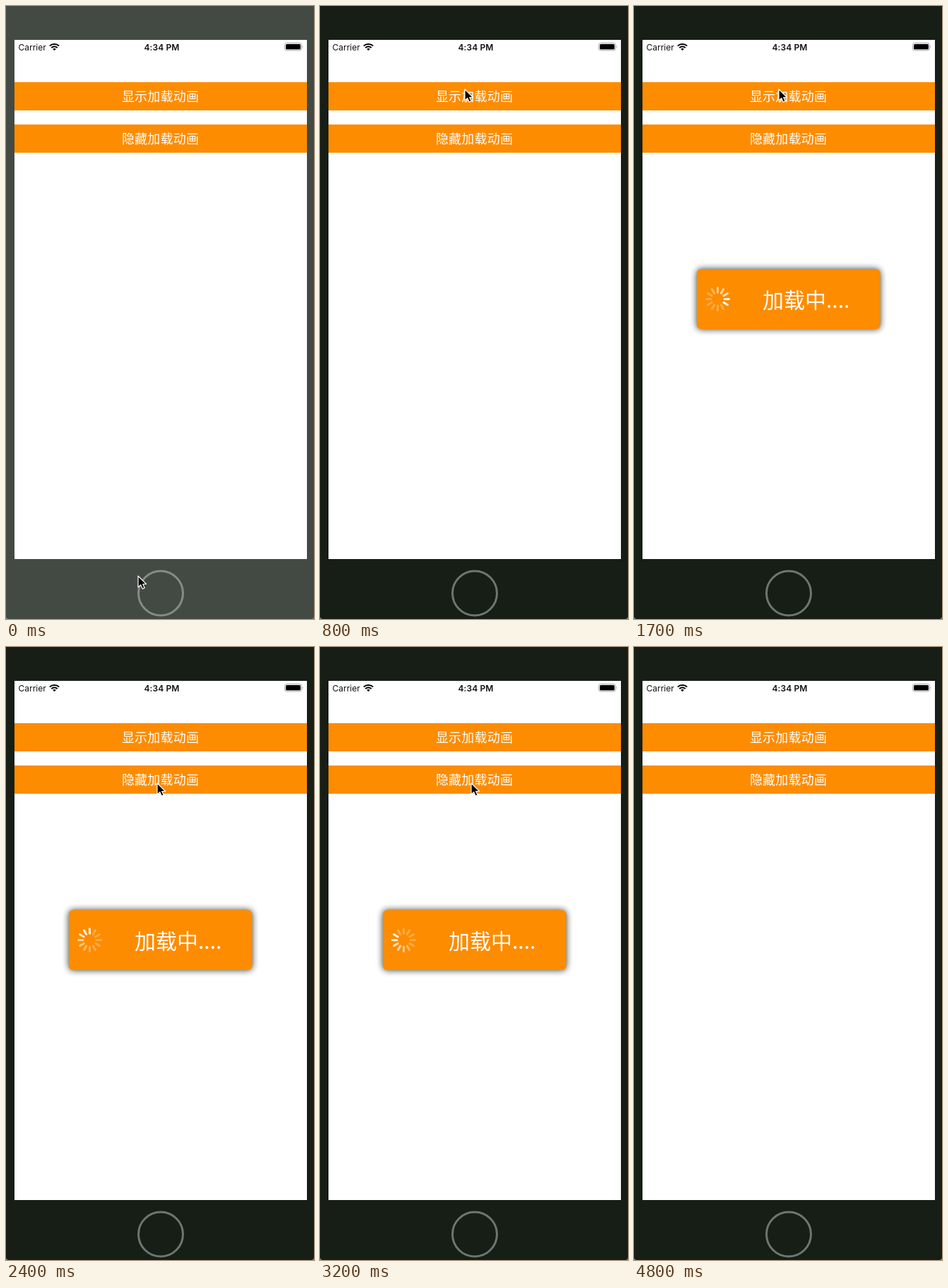
Animation of 436x869 px, one loop 5.3 s. Source, as an HTML page:

```html
<!DOCTYPE html>
<html lang="zh-CN">
<head>
<meta charset="utf-8">
<title>加载动画</title>
<style>
  html, body { margin: 0; width: 100%; height: 100%; overflow: hidden; background: #161e16; }
  svg { display: block; width: 436px; height: 869px; }
  text { font-family: "Noto Sans CJK SC", "Noto Sans CJK", sans-serif; fill: #fff; }
  .status { font: 12px Inter, sans-serif; fill: #111; }
  .button { font-size: 18px; letter-spacing: .2px; text-anchor: middle; }
</style>
</head>
<body>
<svg viewBox="0 0 436 869">
  <defs>
    <filter id="blur" x="-20%" y="-40%" width="140%" height="180%">
      <feGaussianBlur stdDeviation="5"/>
    </filter>
  </defs>

  <rect id="bezel" width="436" height="869"/>
  <path d="M0 866V869H3Q1 868 0 866M436 866V869H433Q435 868 436 866" fill="#777d77"/>
  <circle id="home" cx="219" cy="832.5" r="31.5" fill="none" stroke-width="3"/>
  <rect x="12" y="48" width="414" height="736" fill="#fff"/>

  <text class="status" x="17.5" y="62.5">Carrier</text>
  <g fill="none" stroke="#000" stroke-width="2">
    <path d="M61.8 56.6A9.6 9.6 0 0 1 75.2 56.6"/>
    <path d="M64.3 59.2A6 6 0 0 1 72.7 59.2"/>
  </g>
  <path d="M66.2 60.9Q68.5 59 70.8 60.9L68.5 63.2Z"/>
  <text class="status" x="220.5" y="62.5" text-anchor="middle" style="font-weight:600;letter-spacing:.1px">4:34 PM</text>
  <rect x="394.5" y="52.5" width="24" height="10.5" rx="3" fill="none" stroke="#a5a5a5"/>
  <rect x="396" y="54" width="21" height="7.5" rx="1.6"/>
  <path d="M419.6 56Q421.4 57.7 419.6 59.5Z" fill="#a5a5a5"/>

  <g fill="#fd8c00">
    <rect x="12" y="108" width="414" height="40"/>
    <rect x="12" y="168" width="414" height="40"/>
  </g>
  <text class="button" x="218.5" y="134.6">显示加载动画</text>
  <text class="button" x="218.5" y="194.6">隐藏加载动画</text>

  <g id="popup">
    <rect x="89" y="373" width="259.5" height="85" rx="6" fill="#14241a" opacity=".9" filter="url(#blur)"/>
    <rect x="89" y="373" width="259.5" height="85" rx="6" fill="#fd8c00"/>
    <g id="spinner" transform="translate(118.5 415.5)"></g>
    <text x="182" y="427.5" font-size="30" font-weight="300">加载中....</text>
  </g>

  <path id="cursor" d="M0 0V16L3.7 12.6L6.3 18.2L9.2 16.9L6.7 11.5H11.6Z" stroke="#fff" stroke-width="1.2" stroke-linejoin="round"/>
</svg>
<script>
const LOOP = 5300, STEP = 100, BLADES = 12;
const $ = id => document.getElementById(id);
const set = (el, attrs) => { for (const k in attrs) el.setAttribute(k, attrs[k]); };
const clamp = v => Math.min(1, Math.max(0, v));
const mix = (a, b, u) => a.map((v, i) => v + (b[i] - v) * u);
const easeInOut = u => u * u * (3 - 2 * u);

const blades = Array.from({ length: BLADES }, (_, i) => {
  const line = document.createElementNS("http://www.w3.org/2000/svg", "line");
  set(line, {
    y1: -9.6, y2: -16, stroke: "#fff", "stroke-width": 3,
    "stroke-linecap": "round", transform: `rotate(${i * 30})`
  });
  return $("spinner").appendChild(line);
});

const START = [187, 808], ENTER = [131, 397], SHOW = [205, 118], HIDE = [214, 193], EXIT = [190, 880];

function cursorAt(t) {
  if (t < 100) return START;
  if (t < 1800) return mix(ENTER, SHOW, 1 - (1 - clamp((t - 100) / 700)) ** 2.6);
  if (t < 4600) return mix(SHOW, HIDE, easeInOut(clamp((t - 1800) / 500)));
  return mix(HIDE, EXIT, clamp((t - 4500) / 300) ** 1.3);
}

function popupAlpha(t) {
  if (t < 1200 || t >= 3500) return 0;
  if (t < 1300) return .91;
  return t < 3400 ? 1 : .4;
}

function render(time) {
  const t = Math.floor((time % LOOP) / STEP) * STEP;
  const idle = t < 100;
  set($("bezel"), { fill: idle ? "#434a43" : "#161e16" });
  set($("home"), { stroke: idle ? "#858c84" : "#6f756f" });
  set($("popup"), { opacity: popupAlpha(t) });

  // the brightest blade leads, one turn per second
  const lead = Math.round((300 + (t - 1200) * .36) / 30);
  blades.forEach((blade, i) => {
    const behind = ((lead - i) % BLADES + BLADES) % BLADES;
    set(blade, { opacity: Math.max(.27, 1 - behind * .12) });
  });

  set($("cursor"), { transform: `translate(${cursorAt(t)})` });
}

const begin = performance.now();
function tick() {
  render(performance.now() - begin);
  requestAnimationFrame(tick);
}
tick();
</script>
</body>
</html>
```
